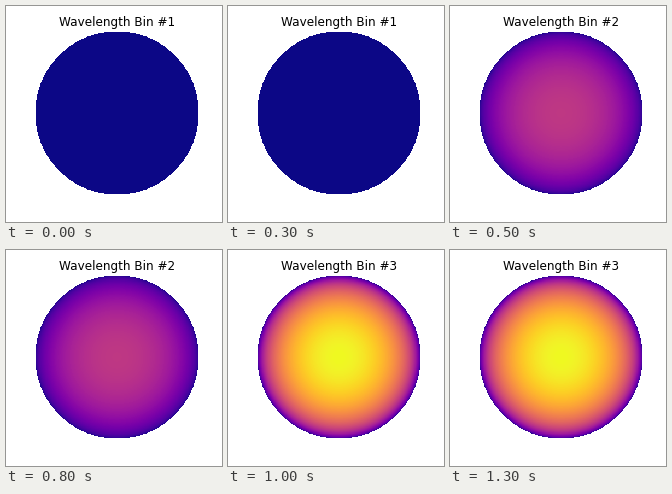
Animation of 216 by 216 pixels, one loop 1.5 s. Source, as a matplotlib script:

```python
import numpy as np
import matplotlib.pyplot as plt
from matplotlib.animation import FuncAnimation

RES = 300
STRENGTH = [0.0, 0.45, 1.0]  # centre brightness in each wavelength bin

plt.rcParams["font.family"] = "DejaVu Sans"

# Height of a unit sphere seen face-on; NaN outside the disc.
axis = np.linspace(-1, 1, RES)
x, y = np.meshgrid(axis, axis)
depth = 1 - x**2 - y**2
mu = np.sqrt(np.where(depth >= 0, depth, np.nan))

fig, ax = plt.subplots(figsize=(3, 3), dpi=72, facecolor="white")
fig.subplots_adjust(left=0.125, right=0.9, bottom=0.125, top=0.88)
ax.axis("off")
disc = ax.imshow(mu, cmap="plasma", vmin=0, vmax=1, origin="lower",
                 extent=(-1, 1, -1, 1), interpolation="nearest")
title = ax.set_title("", fontsize=12)


def draw(i):
    disc.set_data(STRENGTH[i] * mu)
    title.set_text(f"Wavelength Bin #{i + 1}")
    return disc, title


anim = FuncAnimation(fig, draw, frames=len(STRENGTH), interval=500,
                     repeat=True, repeat_delay=0)
plt.show()
```
